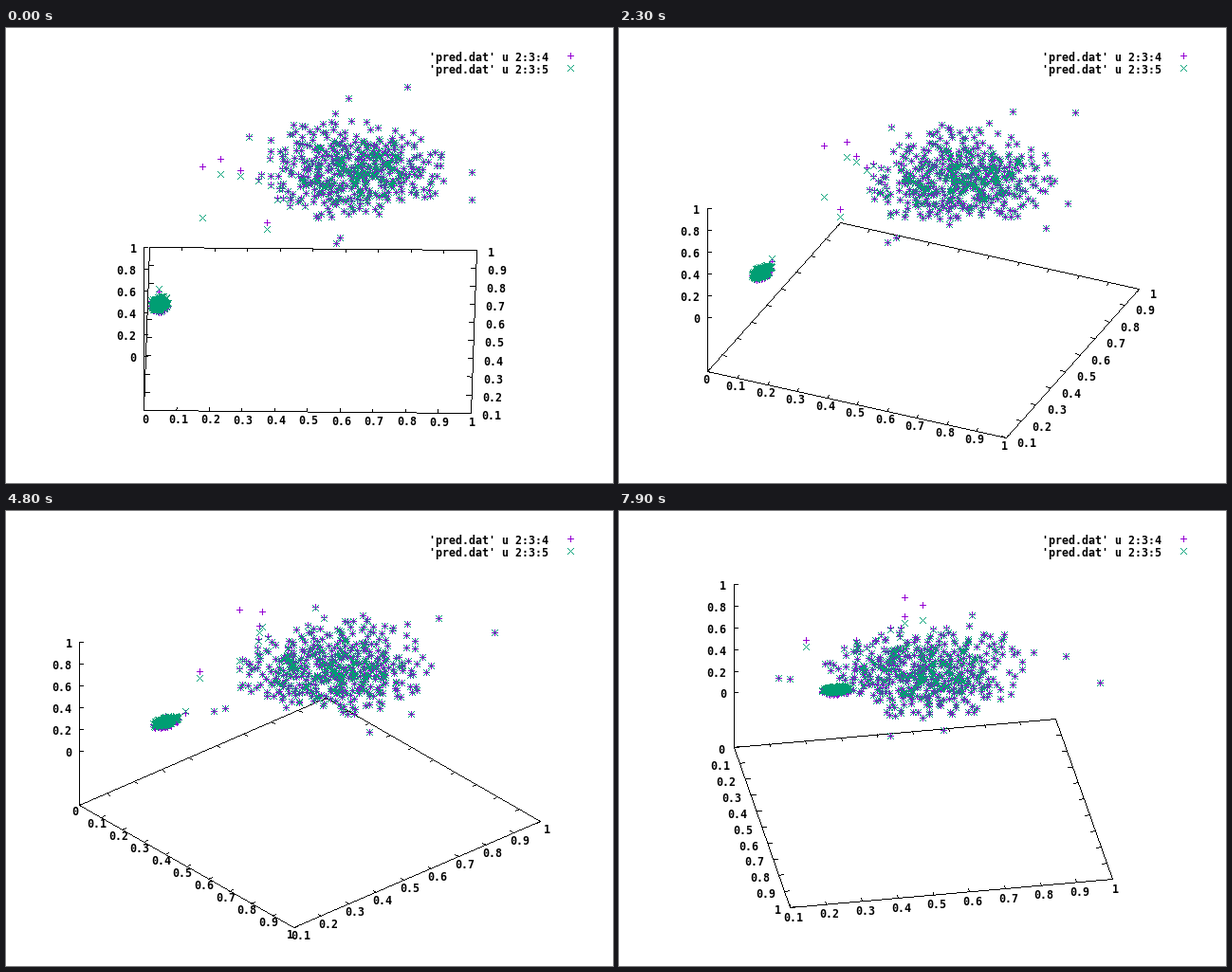
Write a matplotlib script that moves like this. It is 640x480 px and loops after 8000 ms.

```python
import numpy as np
import matplotlib.pyplot as plt
from matplotlib.animation import FuncAnimation

W, H, DPI = 640, 480, 100
PX = 72 / DPI
FRAMES, STEP = 80, 100
CX, CY = 320.3, 319.3             # centre of the base plane
SX, SY, SZ = 344.7, 171.8, 114.3  # pixels per unit of the box
PURPLE, TEAL = "#9400d3", "#009e73"

plt.rcParams.update({
    "font.family": "DejaVu Sans Mono",
    "font.weight": "bold",
    "font.size": 11.63 * PX,
})


def project(u, v, z, a):
    """Base coordinates in -0.5..0.5 and height z, seen at turn angle a."""
    c, s = np.cos(a), np.sin(a)
    return (CX + SX * (u * c + v * s),
            CY + SY * (u * s - v * c) - SZ * (z + 0.5))


def make_data(seed=7):
    """Two classes with labels 0 and 1, and a logistic prediction of them."""
    rng = np.random.default_rng(seed)

    def blob(n, centre, spread, reach):
        r = rng.normal(size=(2 * n, 2))
        r = r[np.hypot(*r.T) < reach][:n]
        return np.array(centre) + r * spread

    tight = blob(500, (-0.457, -0.187), (0.0105, 0.0175), 2.7)
    wide = blob(480, (0.125, 0.0), (0.13, 0.14), 2.4)
    stray = [(-0.33, 0), (-0.274, 0.046), (-0.213, -0.02), (-0.125, -0.34),
             (-0.19, 0.187), (0.289, 0.498), (0.11, 0.425), (0.1, -0.43),
             (0.088, -0.465), (0.495, -0.022), (0.498, -0.19)]
    u, v = np.vstack([tight, [(-0.459, -0.105)], wide, stray]).T
    truth = (u > -0.4).astype(float)
    guess = 1 / (1 + np.exp(-(8.3 + 24.8 * u + 7.3 * v)))
    return u, v, truth, guess


U, V, TRUTH, GUESS = make_data()

fig = plt.figure(figsize=(W / DPI, H / DPI), dpi=DPI, facecolor="white")
ax = fig.add_axes([0, 0, 1, 1])
ax.set(xlim=(0, W), ylim=(H, 0))
ax.axis("off")

ARM = np.arange(-3, 4)
PLUS = np.r_[ARM, 0 * ARM], np.r_[0 * ARM, ARM]
CROSS = np.r_[ARM, ARM], np.r_[ARM, -ARM]


def pixels(color):
    return ax.plot([], [], ls="", marker=",", color=color)[0]


def stamp(artist, shape, x, y):
    """Put one small pixel shape at every point."""
    artist.set_data(*[np.add.outer(np.round(p), d).ravel()
                      for p, d in zip((x, y), shape)])


def trace(p, q):
    """Pixels of a one pixel wide line from p to q."""
    p, q = np.round(p), np.round(q)
    n = int(np.abs(q - p).max())
    return np.round(np.linspace(p, q, n + 1))


def label(text, x=0, y=0, ha="center"):
    return ax.text(x, y, text, ha=ha, va="center_baseline")


box, truth_marks, guess_marks = map(pixels, ("black", PURPLE, TEAL))
for row, (shape, color) in enumerate([(PLUS, PURPLE), (CROSS, TEAL)]):
    label(f"'pred.dat' u 2:3:{4 + row}", 571.5, 30 + 13 * row, "right")
    stamp(pixels(color), shape, [595], [30 + 13 * row])

XT, YT, ZT = np.arange(11) / 10, np.arange(1, 11) / 10, np.arange(6) / 5
XU, YV = XT - 0.5, (YT - 0.1) / 0.9 - 0.5
x_labels = [label(f"{t:g}") for t in XT]
y_labels = [label(f"{t:g}") for t in YT]
z_labels = [label(f"{t:g}", ha="right") for t in ZT]


def place(labels, x, y, ha):
    for item, px, py in zip(labels, x, y):
        item.set_position((px, py))
        item.set_ha(ha)


def box_lines(a):
    """End points of the base edges, the z axis and all ticks."""
    c, s = np.cos(a), np.sin(a)

    def floor(u, v):
        return np.array(project(u, v, -0.5, a))

    corners = [floor(u, v) for u, v in
               [(-0.5, -0.5), (0.5, -0.5), (0.5, 0.5), (-0.5, 0.5)]]
    yield from zip(corners, corners[1:] + corners[:1])
    for side in (-1, 1):
        for u in XU:
            p = floor(u, side / 2)
            yield p, p - side * np.array([5 * s, -3 * c])
        for v in YV:
            p = floor(side / 2, v)
            yield p, p - side * np.array([5 * c, 3 * s])
    foot = corners[0]
    yield foot, foot - (0, 1.5 * SZ)
    for z in ZT:
        p = foot - (0, SZ * (z + 0.5))
        yield p, p + (4, 0)


def draw(i):
    a = np.radians(i + 1)
    c, s = np.cos(a), np.sin(a)
    box.set_data(*np.vstack([trace(p, q) for p, q in box_lines(a)]).T)

    x, y = project(XU, -0.5, -0.5, a)
    if s > 0.8:
        place(x_labels, x - 9.5 * s, y + 8.2 * c, "right")
    else:
        place(x_labels, x + 2 - 8 * s, y + 8.2 * c, "center")
    x, y = project(0.5, YV, -0.5, a)
    if c > 0.8:
        place(y_labels, x + 12, y + 1 + 8 * s, "left")
    else:
        place(y_labels, x + 2.5 + 7 * c, y + 9 * s, "center")
    x, y = project(-0.5, -0.5, ZT, a)
    place(z_labels, np.full(len(ZT), x - 7.5), y, "right")

    stamp(truth_marks, PLUS, *project(U, V, TRUTH, a))
    stamp(guess_marks, CROSS, *project(U, V, GUESS, a))
    return [box, truth_marks, guess_marks, *x_labels, *y_labels, *z_labels]


anim = FuncAnimation(fig, draw, frames=FRAMES, interval=STEP, repeat=True,
                     repeat_delay=0, blit=False)
plt.show()
```
